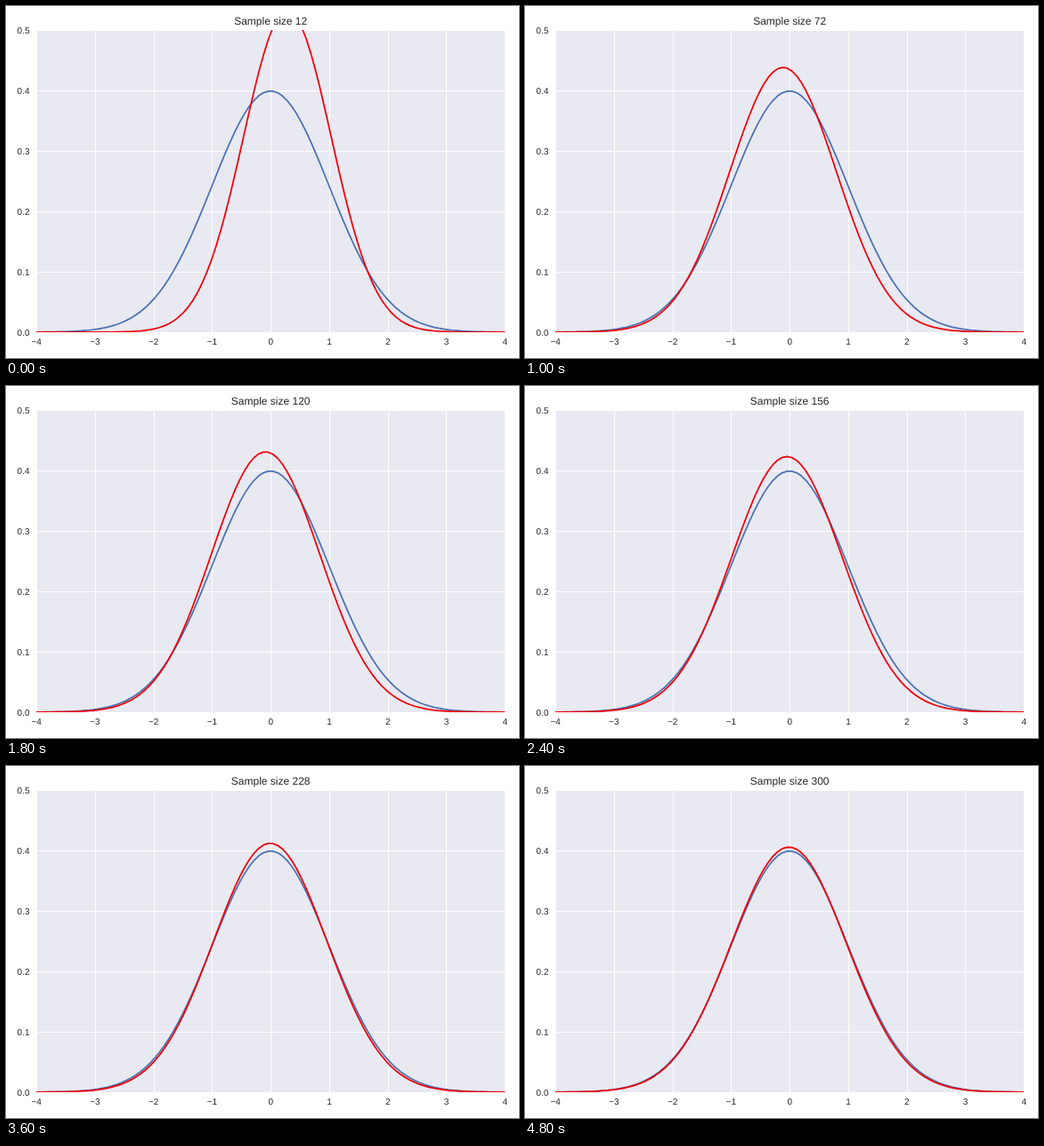
Write an HTML page that moves like this. It is 576 by 396 pixels and loops after 4900 ms.

```html
<!DOCTYPE html>
<html lang="en">
<head>
<meta charset="utf-8">
<title>Sample size</title>
<style>
  html, body { margin: 0; width: 100%; height: 100%; overflow: hidden; background: #fff; }
  svg { display: block; width: 576px; height: 396px; }
  text {
    font: 10px "Liberation Sans", Arial, sans-serif;
    fill: #262626; text-anchor: middle; text-rendering: geometricPrecision;
  }
  #title { font-size: 12px; }
  .y { text-anchor: end; }
  #grid { stroke: #fff; stroke-width: 1; shape-rendering: crispEdges; }
  .curve { fill: none; stroke-width: 1.75; stroke-linejoin: round; }
</style>
</head>
<body>
<svg viewBox="0 0 576 396">
  <clipPath id="plot"><rect x="34" y="27" width="526" height="340"/></clipPath>
  <rect x="34" y="27" width="526" height="340" fill="#e9e9f2"/>
  <path id="grid"/>
  <g clip-path="url(#plot)">
    <path id="normal" class="curve" stroke="#4c72b0"/>
    <path id="fit" class="curve" stroke="#f00008"/>
  </g>
  <g id="labels"></g>
  <text id="title" x="297.2" y="21"></text>
</svg>
<script>
const $ = id => document.getElementById(id);
const LOOP = 4900, STEP = 200, POINTS = 100;
const px = x => 34 + (x + 4) * 65.75;
const py = y => 366.9 - y * 680;
const snap = v => Math.round(v) + 0.5;

// Fitted curves: [sample size, mean, standard deviation]
const fits = [
  [12, 0.288, 0.75], [48, -0.21, 0.9235], [72, -0.11, 0.911], [120, -0.085, 0.9265],
  [180, -0.025, 0.951], [228, -0.005, 0.969], [300, -0.01, 0.984]
];

function bell(mean, sd) {
  const pts = [];
  for (let i = 0; i < POINTS; i++) {
    const x = -4 + 8 * i / (POINTS - 1);
    const y = Math.exp(-(((x - mean) / sd) ** 2) / 2) / (sd * Math.sqrt(2 * Math.PI));
    pts.push(px(x).toFixed(2) + " " + py(y).toFixed(2));
  }
  return "M" + pts.join("L");
}

// Estimates settle in proportion to 1 / sample size
function fitAt(n) {
  const i = Math.max(1, fits.findIndex(f => f[0] >= n));
  const [a, b] = [fits[i - 1], fits[i]];
  const u = (1 / a[0] - 1 / n) / (1 / a[0] - 1 / b[0]);
  return [1, 2].map(k => a[k] + (b[k] - a[k]) * u);
}

function label(x, y, str, cls) {
  const t = document.createElementNS("http://www.w3.org/2000/svg", "text");
  t.setAttribute("x", x);
  t.setAttribute("y", y);
  if (cls) t.setAttribute("class", cls);
  t.textContent = str;
  $("labels").append(t);
}

let grid = "";
for (let x = -4; x <= 4; x++) {
  grid += `M${snap(px(x))} 27V367`;
  label(px(x) + 0.2, 381.3, String(x).replace("-", "\u2212"));
}
for (let i = 0; i <= 5; i++) {
  const y = py(i / 10);
  grid += `M34 ${snap(y)}H560`;
  label(26.5, y + 3.6, (i / 10).toFixed(1), "y");
}
$("grid").setAttribute("d", grid);
$("normal").setAttribute("d", bell(0, 1));

let shown = 0;
const start = performance.now();
function draw(now) {
  const t = Math.max(0, now - start) % LOOP;
  const n = 12 * (Math.floor(t / STEP) + 1);
  if (n !== shown) {
    shown = n;
    $("title").textContent = "Sample size " + n;
    $("fit").setAttribute("d", bell(...fitAt(n)));
  }
  requestAnimationFrame(draw);
}
draw(start);
</script>
</body>
</html>
```
